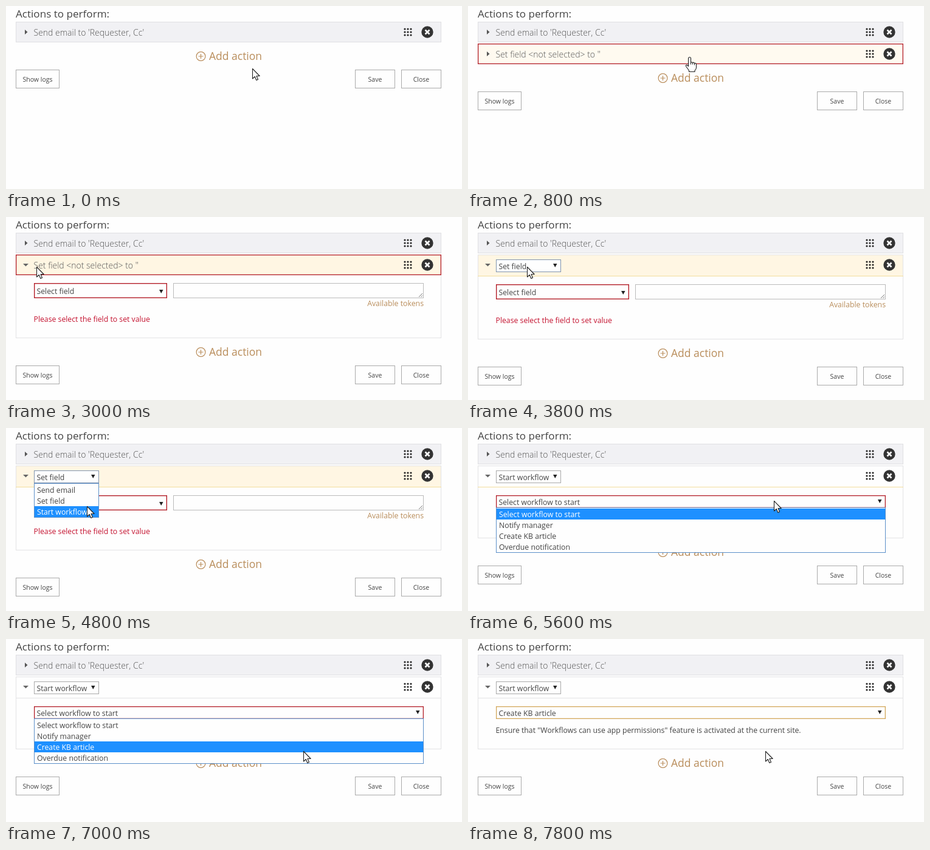
Write an HTML page that moves like this. It is 750 px wide and 302 px high and loops after 8 s.

```html
<!DOCTYPE html>
<html lang="en">
<head>
<meta charset="utf-8">
<title>Actions to perform</title>
<style>
html, body { margin: 0; width: 100%; height: 100%; overflow: hidden; background: #fefefe; }
svg { display: block; width: 750px; height: 302px; font-family: "Open Sans", "Noto Sans", sans-serif; white-space: pre; }
</style>
</head>
<body>
<svg id="stage" viewBox="0 0 750 302"></svg>
<script>
const LOOP = 8000, STEP = 200;
const TAN = '#b98d5b', RED = '#b3202a', INK = '#444', LINE = '#e3e3e5';
const FIELDS = ['Send email', 'Set field', 'Start workflow'];
const FLOWS = ['Select workflow to start', 'Notify manager', 'Create KB article', 'Overdue notification'];

// Pointer keys: time, x, y
const PATH = [
  [0, 405, 103], [200, 401, 100], [600, 364, 84], [800, 364, 84], [1200, 200, 87],
  [1600, 150, 88], [2000, 71, 89], [2600, 53, 84], [2800, 50, 82], [3600, 50, 82],
  [4000, 143, 82], [4400, 143, 82], [4800, 133, 129], [5200, 133, 130],
  [5600, 503, 120], [5800, 503, 120], [6200, 499, 150], [6400, 496, 169],
  [6600, 492, 179], [7000, 489, 185], [LOOP, 489, 185]
];

function pointerAt(t) {
  const i = PATH.findIndex(k => k[0] > t);
  const [t0, x0, y0] = PATH[i - 1], [t1, x1, y1] = PATH[i];
  const u = (t - t0) / (t1 - t0);
  return [Math.round(x0 + (x1 - x0) * u), Math.round(y0 + (y1 - y0) * u)];
}

const escapeText = s => s.replace(/&/g, '&amp;').replace(/</g, '&lt;');
const text = (s, x, y, size = 12.25, fill = INK, extra = '') =>
  `<text x="${x}" y="${y}" font-size="${size}" fill="${fill}" ${extra}>${escapeText(s)}</text>`;
const fillBox = (x, y, w, h, fill) =>
  `<rect x="${x}" y="${y}" width="${w}" height="${h}" fill="${fill}"/>`;
const box = (x, y, r, b, stroke, fill = '#fefefe', w = 1) =>
  `<rect x="${x + w / 2}" y="${y + w / 2}" width="${r - x - w}" height="${b - y - w}" fill="${fill}" stroke="${stroke}" stroke-width="${w}"/>`;
const path = (d, fill, extra = '') => `<path d="${d}" fill="${fill}" ${extra}/>`;

function rowHead(y, label, open) {
  let s = open ? path(`M28 ${y - 2}h9l-4.5 4.5z`, '#666') : path(`M31 ${y - 4}v8l4.5-4z`, '#555');
  if (label) s += text(label, 45.5, y + 6, 14, '#555', 'font-weight="300"');
  for (let i = 0; i < 9; i++)
    s += `<circle cx="${656 + i % 3 * 5}" cy="${y - 5 + Math.floor(i / 3) * 5}" r="1.6" fill="#222"/>`;
  return s + `<circle cx="693" cy="${y}" r="9.7" fill="#333"/>` +
    path(`M689.5 ${y - 3.5}l7 7m0-7l-7 7`, 'none', 'stroke="#fff" stroke-width="2.6"');
}

function select(x, y, r, b, label, stroke, w = 1) {
  return box(x, y, r, b, stroke, '#fefefe', w) + text(label, x + 4.5, b - 5) +
    path(`M${r - 13} ${b - 14}h6.5l-3.25 6z`, '#222');
}

function list(x, y, r, b, options, active) {
  return box(x, y, r, b, '#5b8fc9') + options.map((label, i) => {
    const top = b - 1 - 18 * (options.length - i), on = i === active;
    return (on ? fillBox(x + 1, top, r - x - 2, 18, '#1e90ff') : '') +
      text(label, x + 5, top + 13.5, 12.25, on ? '#fff' : INK);
  }).join('');
}

function button(x, r, y, label) {
  return box(x, y, r, y + 31, '#aaa') +
    text(label, (x + r) / 2, y + 20, 10.5, INK, 'text-anchor="middle"');
}

function footer(d) {
  return `<circle cx="320.5" cy="${83 + d}" r="7.4" fill="none" stroke="${TAN}" stroke-width="1.2"/>` +
    path(`M316.5 ${83 + d}h8m-4-4v8`, 'none', `stroke="${TAN}" stroke-width="1.2"`) +
    text('Add action', 334, 89 + d, 17.5, TAN) +
    button(16, 88, 105 + d, 'Show logs') +
    button(574, 640, 105 + d, 'Save') + button(650, 716, 105 + d, 'Close');
}

function fieldPanel(d) {
  return box(16, 95 + d, 716, 200 + d, LINE) +
    select(46, 109 + d, 265, 134 + d, 'Select field', RED, 1.4).replace(`y="${129 + d}"`, `y="${127 + d}"`) +
    box(275, 109 + d, 687, 134 + d, '#bbb') +
    path(`M679 ${132 + d}l6-6m-2.5 6l2.5-2.5`, 'none', 'stroke="#777"') +
    text('Available tokens', 687, 147 + d, 12.3, TAN, 'text-anchor="end"') +
    text('Please select the field to set value', 45.5, 173 + d, 12.25, '#c4122f');
}

function workflowPanel(chosen) {
  return box(16, 97, 716, 182, LINE) +
    select(46, 111, 687, 132, chosen ? FLOWS[2] : FLOWS[0], chosen ? '#d2a85c' : RED, 1.3) +
    text('Ensure that "Workflows can use app permissions" feature is activated at the current site.', 45.5, 155);
}

function pointer(t) {
  const [x, y] = pointerAt(t), hand = t >= 400 && t < 2600;
  const shape = hand
    ? 'M-2 2Q-2 0 0 0T2 2V9Q3 7.5 5 9Q7 8 8 10Q11 9.5 11 12V17Q11 20 8.5 22V24H-1V22L-6 15Q-7 12.5-4 13L-2 15ZM2 9V12M5 9V12M8 10V13'
    : 'M0 0V16.5L3.8 13L6.3 19L9 17.8L6.5 12H11.7Z';
  return `<g transform="translate(${x + .5} ${y + .5})">` +
    path(shape, '#fff', 'stroke="#222" stroke-width="1.1" stroke-linejoin="round"') + '</g>';
}

function secondRow(t) {
  const expanded = t >= 2800, editing = t >= 3600, workflow = t >= 5200;
  if (!editing) {
    return (expanded ? fieldPanel(0) : '') +
      box(16, 62, 716, 96, RED, t < 1000 ? '#fffaf0' : '#fff6e3', 1.3) +
      rowHead(79, "Set field <not selected> to ''", expanded);
  }
  const fill = t < 5200 ? '#fff6e3' : t < 5400 ? '#fffbf2' : '#fefefe';
  return (workflow ? workflowPanel(t >= 7400) : fieldPanel(2)) +
    box(16, 62, 716, 98, LINE, fill) +
    fillBox(16, 97, 700, 1, t < 6000 ? '#f3dd9c' : LINE) +
    rowHead(79, '', true) +
    select(46, 70, 153, 91, workflow ? FIELDS[2] : FIELDS[1], workflow ? '#aaa' : '#7f93ad');
}

function dropdown(t) {
  if (t >= 4400 && t < 5200) return list(46, 91, 153, 148, FIELDS, t < 4800 ? 1 : 2);
  if (t >= 5600 && t < 7400) {
    const active = Math.max(0, Math.floor((pointerAt(t)[1] - 135) / 18));
    return list(46, 131, 687, 206, FLOWS, active);
  }
  return '';
}

function scene(t) {
  const shift = t < 800 ? 0 : t < 2800 ? 36 : t < 3600 ? 140 : t < 5200 ? 142 : 122;
  return text('Actions to perform:', 16, 19, 17.1, INK) +
    box(16, 26, 716, 60, '#e0e0e3', '#f1f1f4') +
    rowHead(43, "Send email to 'Requester, Cc'", false) +
    (t >= 800 ? secondRow(t) : '') + footer(shift) + dropdown(t) + pointer(t);
}

const stage = document.getElementById('stage'), start = performance.now();
let shown = -1;
function tick() {
  const t = Math.floor((performance.now() - start) % LOOP / STEP) * STEP;
  if (t !== shown) stage.innerHTML = scene(shown = t);
  requestAnimationFrame(tick);
}
tick();
</script>
</body>
</html>
```
